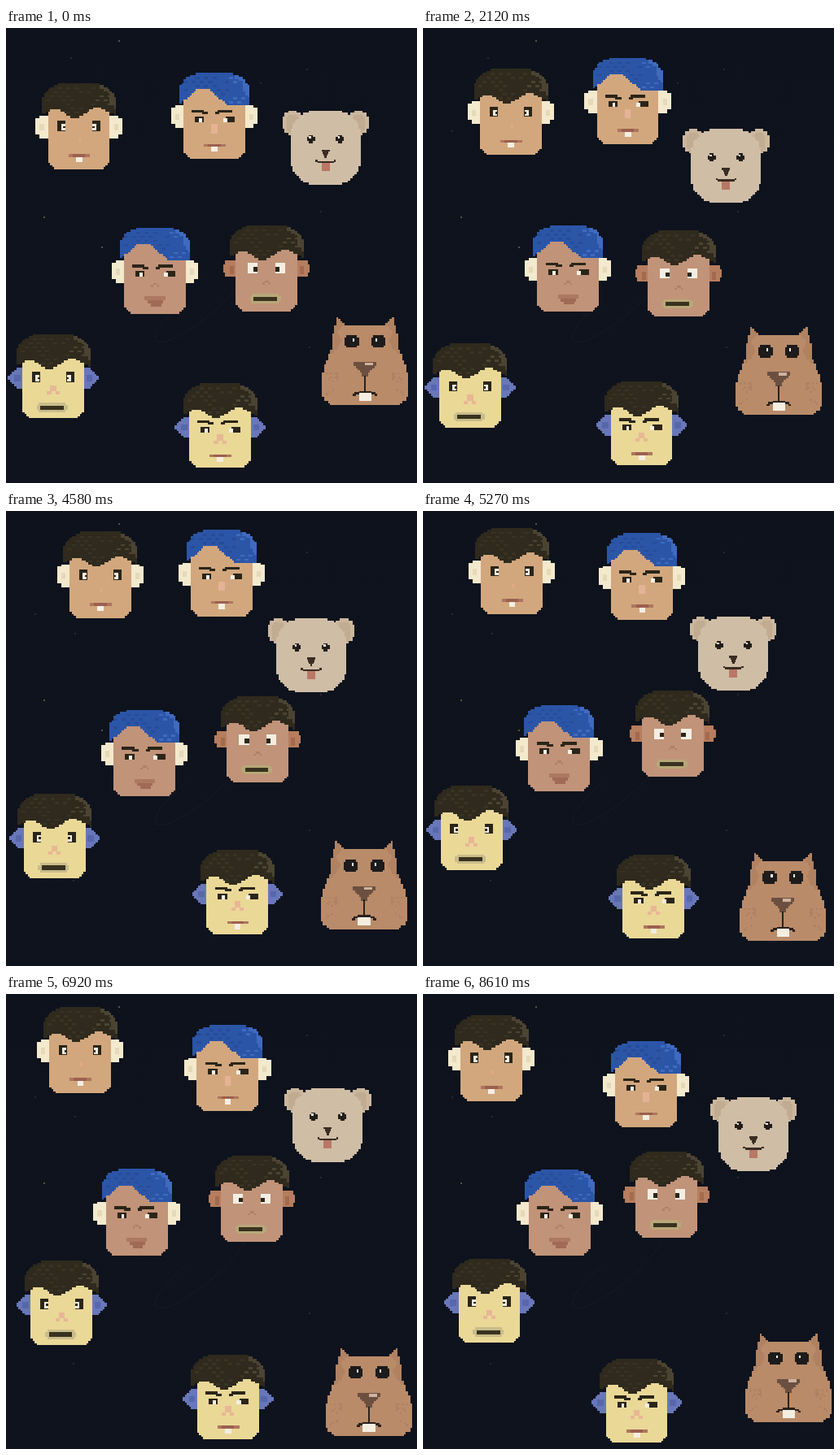
An HTML page that plays this animation: 505x560 px, repeating every 8660 ms.

```html
<!DOCTYPE html>
<html lang="en">
<head>
<meta charset="utf-8">
<title>Drifting pixel heads</title>
<style>
html, body { margin: 0; width: 100%; height: 100%; overflow: hidden; background: #0d121c; }
svg { display: block; width: 100%; height: 100%; }
</style>
</head>
<body>
<svg id="stage" viewBox="0 0 505 560" xmlns="http://www.w3.org/2000/svg">
  <defs>
    <linearGradient id="sky" x1="0" y1="0" x2="0" y2="1">
      <stop offset="0" stop-color="#0d121c"/>
      <stop offset="1" stop-color="#0e131e"/>
    </linearGradient>
  </defs>
  <rect width="505" height="560" fill="url(#sky)"/>
  <circle cx="237" cy="343" r="46" fill="#0e131e"/>
  <path d="M169 387A68 19 -37 0 0 293 305" transform="translate(14 0)" fill="none" stroke="none"/>
  <path d="M220 335C190 360 178 380 186 386C204 392 272 344 293 305" fill="none" stroke="#151c28"/>
  <g id="stars"></g>
  <g id="heads" shape-rendering="crispEdges"></g>
</svg>
<script>
const CELL = 2.53, LOOP = 8660, HOLD = 490, STEP = 140 / 3;
const NS = 'http://www.w3.org/2000/svg';
const INK = '#2b2518', WHITE = '#f4eee2';
const $ = id => document.getElementById(id);

function add(parent, tag, attrs) {
  const el = document.createElementNS(NS, tag);
  for (const k in attrs) el.setAttribute(k, attrs[k]);
  return parent.appendChild(el);
}

function random(seed) {
  return () => (seed = (seed * 16807) % 2147483647) / 2147483647;
}

// Collects cell rectangles; a pair is a box and its mirror image about the axis
function pen(axis) {
  const parts = [];
  const box = (color, x, y, w, h = 1) => {
    const d = `M${x} ${y}h${w}v${h}h${-w}z`;
    const last = parts[parts.length - 1];
    if (last && last.color === color) last.d += d;
    else parts.push({ color, d });
  };
  const pair = (color, x, y, w, h) => {
    box(color, x, y, w, h);
    box(color, 2 * axis - x - w, y, w, h);
  };
  const blob = (color, x, y, w, h, r) => {
    for (let j = 0; j < h; j++) {
      const e = Math.max(0, r - Math.min(j, h - 1 - j) - 0.5);
      const inset = Math.round(r - Math.sqrt(r * r - e * e));
      box(color, x + inset, y + j, w - 2 * inset);
    }
  };
  return { parts, box, pair, blob };
}

const HAIR = {
  brown: {
    inset: 0, base: '#2f2a1d', dash: '#393324', edge: '#4c4432', drop: 7,
    low: x => 15.3 + 2.2 * Math.cos((x - 16) / 21 * 2 * Math.PI) - x * 0.04
  },
  blue: {
    inset: 1, base: '#2b55a7', dash: '#274c98', edge: '#3f6abf', drop: 6,
    low: x => Math.min(16, 8 + Math.max(0, Math.abs(x - 12) - 3) * 0.9)
  }
};

function hair(p, { inset, base, dash, edge, drop, low: curve }) {
  const rnd = random(11), end = 36 - inset, half = 17.5 - inset;
  const top = x => Math.round(drop * Math.abs((x - 17.5) / half) ** 4.5);
  const low = x => Math.round(curve(x));
  for (let x = inset; x < end; x++) p.box(base, x, top(x), 1, low(x) - top(x));
  for (let y = 2; y < 15; y += 2)
    for (let x = inset + 2 + (y & 2); x < end - 3; x += 4)
      if (rnd() < 0.5 && y > top(x) && y < low(x) - 1 && y < low(x + 2) - 1)
        p.box(x > 24 ? edge : dash, x, y, 2);
  for (let x = 28; x < end; x++) p.box(edge, x, top(x), 1, x > end - 4 ? 6 : 2);
}

const EARS = {
  cream(p) {
    p.pair('#f3e9cd', -3, 17, 6, 8);
    p.pair('#f3e9cd', -1, 16, 4, 11);
    p.pair('#e6d9b8', -1, 20, 2, 3);
  },
  brown(p) {
    p.pair('#b67d5e', -2, 17, 5, 8);
    p.pair('#b67d5e', -3, 19, 6, 4);
    p.pair('#a26a4e', 0, 20, 2, 4);
  },
  violet(p) {
    for (let x = -4; x < 3; x++) {
      const r = Math.min(5, x + 5);
      p.pair('#6877ba', x, 21.5 - r, 1, 2 * r);
    }
    p.pair('#5767ab', -1, 20, 3, 3);
  }
};

const EYES = {
  wide(p) {
    p.pair(INK, 7.6, 18.5, 4, 5);
    p.pair(WHITE, 9.4, 20, 2, 3);
    p.pair(INK, 10.4, 21, 1);
  },
  angry(p) {
    p.box(INK, 7, 18, 6, 1.4);
    p.box(INK, 12, 19, 3, 1.2);
    p.box(INK, 19.5, 18, 7, 1.4);
    p.box(INK, 18.5, 19, 2, 1.2);
    for (const x of [8.5, 23.5]) p.box(INK, x, 21.2, 4.5, 2.8);
    p.box(WHITE, 10.5, 22, 1.5, 2);
    p.box(WHITE, 22.2, 22, 2, 2);
  },
  white(p) {
    p.pair(WHITE, 9, 18.5, 4.8, 5);
    p.pair(INK, 11.6, 20.5, 2.2, 2.2);
  }
};

const MOUTH = {
  tooth(p) {
    p.box('#ae7560', 13, 34.6, 10.5, 1.4);
    p.box('#9c604e', 15, 34.6, 6, 1.4);
    p.box(WHITE, 16.6, 36, 3, 2.5);
  },
  lips(p) {
    p.box('#ad7860', 13, 33.5, 10, 2);
    p.box('#a06a55', 14.5, 35.5, 7.5, 1.5);
    p.box('#a06a55', 16, 37, 5, 1.5);
  },
  grim(p, tone) {
    p.box(tone, 11, 33.5, 13, 4.6);
    p.box(tone, 10, 34.5, 15, 2.6);
    p.box('#38321f', 11.8, 34.8, 11.4, 2.1);
  }
};

const NOSE = {
  dot(p) { p.box('#e2a88c', 18, 27, 1, 2); },
  long(p) { p.box('#e6b296', 16.5, 25, 3, 4.5); },
  flat(p) {
    p.box('#b08068', 17, 27, 2);
    p.box('#b08068', 16, 28, 1);
    p.box('#b08068', 19, 28, 1);
  },
  wide(p) {
    p.box('#e8b795', 16.5, 25, 3, 3);
    p.box('#e8b795', 15, 28, 2, 1.5);
    p.box('#e8b795', 19, 28, 2, 1.5);
  }
};

function person(skin, ear, cut, eyes, nose, mouth, tall, tone) {
  const p = pen(18);
  EARS[ear](p);
  p.box(skin, 3, 8, 30, tall - 11);
  for (let i = 0; i < 3; i++) p.box(skin, 4 + i, tall - 3 + i, 28 - 2 * i);
  hair(p, HAIR[cut]);
  EYES[eyes](p);
  NOSE[nose](p);
  MOUTH[mouth](p, tone);
  return p.parts;
}

function bear() {
  const p = pen(21), dark = '#3a2d22';
  for (const x of [0, 32]) {
    p.blob('#cbb79e', x, 0, 10, 12, 5);
    p.blob('#c1ac92', x + 2, 2, 6, 9, 3);
  }
  p.blob('#cfbda6', 4, 0, 34, 36, 12);
  for (const x of [12, 26]) {
    p.blob('#221d19', x, 12, 4, 4, 1.8);
    p.box(WHITE, x + 1, 12.5, 1);
  }
  for (let i = 0; i < 4; i++) p.box(dark, 19 + i * 0.5, 19 + i, 4 - i);
  p.pair(dark, 16, 24, 1);
  p.box(dark, 17, 24.6, 8);
  p.blob('#b97766', 19, 25.6, 4, 4, 1.5);
  return p.parts;
}

function rodent() {
  const p = pen(21), shade = '#b08261', dark = '#2b211b', rnd = random(31);
  const half = y => Math.round(21 - 6 / (1 + Math.exp((y - 19) / 3))
    - 0.16 * Math.max(0, y - 37) ** 2 - 1.3 * Math.max(0, 7 - y));
  for (let y = 0; y < 13; y++) p.pair(shade, Math.max(5, 7 - (y >> 2)), y, Math.min(8, 1 + y));
  for (let y = 4; y < 43; y++) p.box('#b98b69', 21 - half(y), y, 2 * half(y));
  for (let y = 6; y < 18; y++) p.pair(shade, 21 - half(y), y, 4 - Math.abs(y - 12) / 2);
  for (let i = 0; i < 14; i++) p.pair(shade, 2 + Math.floor(rnd() * 6), 27 + Math.floor(rnd() * 11), 1);
  for (const x of [11, 24]) p.blob('#1d1b1b', x, 9, 7, 6, 3);
  p.pair(WHITE, 15, 10.5, 1, 1.5);
  for (let i = 0; i < 7; i++) {
    const inset = Math.min(4, Math.max(0, i - 1));
    p.box('#6b5040', 15.5 + inset, 22 + i, 11 - 2 * inset);
  }
  p.box('#d0b29d', 21, 22.3, 4, 1.4);
  p.box(dark, 20.5, 28.5, 1, 8);
  p.box(dark, 18, 36, 6);
  p.pair(dark, 16, 36.6, 2);
  p.pair(dark, 15, 37.5, 1.5);
  p.blob(WHITE, 18, 37, 6, 4, 1.5);
  return p.parts;
}

const TAN = '#d2a77d', ROSE = '#c19379', LEMON = '#ead897';
// Each path is a few points at even times
const HEADS = [
  { parts: person(TAN, 'cream', 'brown', 'wide', 'dot', 'tooth', 42),
    path: [[44, 67.5], [62.5, 50], [74.5, 32.7], [62.9, 20.2], [44.8, 16], [38.5, 25.5]] },
  { parts: person(TAN, 'cream', 'blue', 'angry', 'long', 'tooth', 42),
    path: [[210.5, 55], [206, 36.5], [214, 21.5], [224, 28], [227, 39], [228.5, 58]] },
  { parts: bear(),
    path: [[339.5, 101.5], [319.3, 124], [316.5, 132.5], [329, 129.5], [343, 115.4], [353, 127]] },
  { parts: person(ROSE, 'cream', 'blue', 'angry', 'flat', 'lips', 42),
    path: [[137.5, 245.5], [132.8, 243], [128, 248.8], [121.5, 237.7], [115, 214.7], [122.5, 215.5]] },
  { parts: person(ROSE, 'brown', 'brown', 'white', 'flat', 'grim', 42, '#b8a878'),
    path: [[274.5, 242.5], [268.5, 249], [266.3, 235.5], [261, 220], [256.3, 198], [253.5, 193.5]] },
  { parts: rodent(),
    path: [[388, 355.5], [384, 367.7], [384.5, 388.7], [389.3, 422], [393, 435.5], [396, 418]] },
  { parts: person(LEMON, 'violet', 'brown', 'wide', 'wide', 'grim', 41, '#c9bc8b'),
    path: [[12.5, 376.5], [12.3, 388], [14.8, 362.5], [14.3, 337], [23.4, 328], [36, 325.5]] },
  { parts: person(LEMON, 'violet', 'brown', 'angry', 'wide', 'tooth', 41),
    path: [[217.5, 437], [223, 434.5], [237, 415.7], [237.5, 423.4], [226.7, 444.7], [217, 448.5]] }
];

// Smooth curve through the points, u from 0 to 1
function along(path, axis, u) {
  const last = path.length - 1, v = i => path[i][axis];
  const mid = i => (v(i + 1) - v(i - 1)) / 2;
  const slope = i =>
    i === 0 ? 2 * (v(1) - v(0)) - mid(1) :
    i === last ? 2 * (v(last) - v(last - 1)) - mid(last - 1) : mid(i);
  const i = Math.min(last - 1, Math.floor(u * last));
  const s = u * last - i, q = 1 - s;
  return q * q * (1 + 2 * s) * v(i) + s * s * (3 - 2 * s) * v(i + 1)
    + s * q * (q * slope(i) - s * slope(i + 1));
}

const STARS = {
  '#5c5144': [[139, 16], [47, 233], [118, 270]],
  '#282a31': [[80, 37], [370, 51], [313, 68], [36, 127], [85, 151], [387, 226], [373, 393], [83, 455]]
};
for (const fill in STARS)
  for (const [x, y] of STARS[fill])
    add($('stars'), 'rect', { x: x - 1, y: y - 1, width: 2, height: 2, fill });

for (const head of HEADS) {
  head.el = add($('heads'), 'g', {});
  for (const { d, color } of head.parts) add(head.el, 'path', { d, fill: color });
}

const STEPS = Math.round((LOOP - HOLD) / STEP);

function draw(now) {
  const t = now % LOOP;
  const step = t < HOLD ? 0 : Math.floor((t - HOLD) / STEP + 0.05) + 1;
  const u = Math.min(1, step / STEPS);
  for (const { el, path } of HEADS) {
    const [x, y] = [0, 1].map(axis => along(path, axis, u).toFixed(2));
    el.setAttribute('transform', `translate(${x} ${y}) scale(${CELL})`);
  }
}

let start;
function tick(now) {
  if (start === undefined) start = now;
  draw(now - start);
  requestAnimationFrame(tick);
}
draw(0);
requestAnimationFrame(tick);
</script>
</body>
</html>
```
